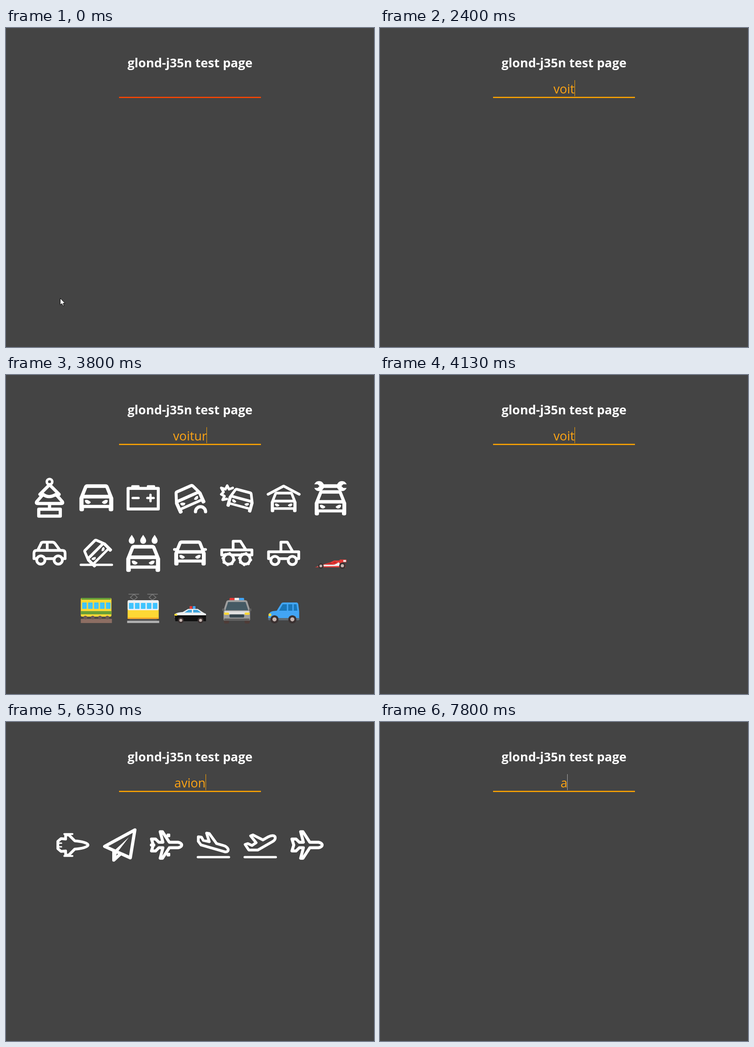
These frames come from a looping animation (804 px wide and 697 px high, 8000 ms). An HTML page:

```html
<!DOCTYPE html>
<html lang="en">
<head>
<meta charset="utf-8">
<title>Icon search</title>
<style>
  html, body { margin: 0; width: 100%; height: 100%; overflow: hidden; background: #444; }
  svg { display: block; width: 804px; height: 697px; }
  text { font-family: "Open Sans", "Noto Sans", sans-serif; text-anchor: middle; white-space: pre; }
  #title { font-size: 27.1px; font-weight: 700; fill: #fff; }
  #query { font-size: 27px; fill: #ffa514; }
  .line { fill: none; stroke: #fff; stroke-width: 6.5; stroke-linecap: round; stroke-linejoin: round; }
  .solid { fill: #fff; fill-rule: evenodd; }
  .wheel { fill: #444; stroke: #fff; stroke-width: 6; }
</style>
</head>
<body>
<svg viewBox="0 0 804 697">
  <rect width="804" height="697" fill="#444"/>
  <text id="title" x="402" y="86">glond-j35n test page</text>
  <text id="query" x="402" y="143"></text>
  <rect id="rule" x="247" y="150.4" width="310" height="2.6"/>
  <rect id="caret" y="114" width="1" height="35"/>
  <g id="icons"></g>
  <path id="cursor" d="M.5.5V15L4 12 6.3 17H8.7L6.7 11.5H11Z" fill="#fff" stroke="#000"/>
</svg>
<script>
const LOOP = 8000, PITCH = 102.3, PER_ROW = 7;
const $ = id => document.getElementById(id);

// Shape helpers; every icon is drawn around its cell centre.
const line = (d, w = 6.5) => `<path class="line" d="${d}" style="stroke-width:${w}"/>`;
const solid = d => `<path class="solid" d="${d}"/>`;
const fill = (d, color) => `<path d="${d}" fill="${color}"/>`;
const box = (x, y, w, h, color, r = 0) =>
  `<rect x="${x}" y="${y}" width="${w}" height="${h}" rx="${r}" fill="${color}"/>`;
const dot = (x, y, r, color) => `<circle cx="${x}" cy="${y}" r="${r}" fill="${color}"/>`;
const wheel = (x, y, r = 9) => `<circle class="wheel" cx="${x}" cy="${y}" r="${r}"/>`;
const tyre = (x, y, r) => dot(x, y, r, '#3a3030') + dot(x, y, r * .5, '#c5b5b0');
const place = (art, x, y, scale = 1, turn = 0) =>
  `<g transform="translate(${x} ${y}) rotate(${turn}) scale(${scale})">${art}</g>`;
const repeat = (n, draw) => Array.from({ length: n }, (_, i) => draw(i)).join('');

const car = solid('M-37 0L-27-25Q-25-30-20-30H20Q25-30 27-25L37 0V25Q37 29 33 29H31Q27 29 27 25V22H-27V25Q-27 29-31 29H-33Q-37 29-37 25Z' +
  'M-20-22L-26-7H26L20-22ZM-28 1V15H28V1Z') +
  solid('M-25 5Q-20 2-12 9Q-14 13-18 13Q-25 12-25 5Z') +
  solid('M25 5Q20 2 12 9Q14 13 18 13Q25 12 25 5Z');

const wrench = dot(-25, -26, 11, '#fff') + dot(25, -26, 11, '#fff') + box(-22, -30, 44, 8, '#fff') +
  fill('M-38-30H-28L-24-26-28-22H-38ZM38-30H28L24-26 28-22H38Z', '#444');

const drop = solid('M0-40C4-34 6.5-31 6.5-27A6.5 6.5 0 0 1-6.5-27C-6.5-31-4-34 0-40Z');

const plane = line('M25-6H6L-9-29H-14L-8-6H-17L-24-13H-33L-29 0-33 13H-24L-17 6H-8L-14 29H-9L6 6H25C31 5 33 2 33 0S31-5 25-6Z');

const airliner = (body, wing) =>
  fill('M-34 0Q-33-5-27-5H22Q34-4 34 1 32 6 22 6H-22Q-32 6-34 0Z', body) +
  fill('M-34-16H-26L-16-4H-31Z', wing) + fill('M8 0H-6L-23 20H-15Z', wing) +
  fill('M9-5H-2L-11-18H-5Z', wing) + fill('M23-4H29L32-1H23Z', '#40c4ff') +
  repeat(6, i => box(-18 + i * 6, -2, 3, 3, '#40a5dc', 1));
const runway = box(-34, 29, 68, 5, '#90a4ae');

const cars = [
  // air freshener
  '<circle class="line" cy="-35.5" r="6" style="stroke-width:5.5"/>' +
    line('M0-29L-21-8H-14L-28 8Q-30 12-26 12H26Q30 12 28 8L14-8H21ZM-14-8Q-2 2 14-8M0 12V23', 7) +
    line('M-23.5 24.5H23.5V39.5H-23.5Z', 7),
  car,
  line('M-33-21H33V24H-33Z') + box(-26, -28, 18, 8, '#fff', 2) + box(8, -28, 18, 8, '#fff', 2) +
    line('M-23 0H-10M9 0H23M16-7V7', 5),
  place(car, -4, 0, .85, -24) + line('M12 30A11 11 0 0 1 34 30', 7),
  place(car, 9.5, 4, .76, 15) + line('M-9-22L-17-19-21-27-25-19-34-22-29-13-34-8-27-4-31 4-22 2', 5.5),
  line('M-34-8L0-26 34-8', 6) + place(car, 0, 9, .76),
  wrench + place(car, 0, 11, .93),
  line('M-34 12V0Q-34-6-28-6H-26L-19-20Q-18-24-14-24H6Q10-24 12-21L23-6H28Q34-6 34 0V12ZM-26-6H23M-5-24V-6', 6) +
    wheel(-19, 15) + wheel(19, 15),
  place(car, 0, -3, .76, -45) + line('M-34 25.5H34', 5),
  [-25, 0, 25].map(x => place(drop, x, 0)).join('') + place(car, 0, 12),
  place(car, 0, 0, .93) + line('M-34-8H-27M27-8H34', 6),
  line('M-33 4V-7H-8V-26H8L20-7H33V4ZM-8-7H20', 6) +
    [-18, 18].map(x => wheel(x, 13, 11) +
      `<circle class="line" cx="${x}" cy="13" r="13.5" stroke-dasharray="4 6.6" style="stroke-width:4;stroke-linecap:butt"/>`).join(''),
  line('M-33 12V-3H-6V-24H8L20-3H33V12ZM-6-3H20', 6) + wheel(-19, 16) + wheel(19, 16),
  // racing car
  fill('M-34 31L-14 24 0 20 8 16H20L33 25V31Z', '#e53935') + fill('M-30 29L-12 25H9L18 20 24 28Z', '#eee') +
    fill('M-12 25L0 21 8 25ZM4 21L10 18 15 23Z', '#c62828') + box(20, 14, 15, 6, '#e53935', 1) + box(28, 15, 6, 4, '#eee') +
    tyre(-21, 28, 6) + tyre(26, 27.5, 7),
  // railway carriage
  box(-34, 23, 68, 9, '#8d6e63') + box(-30, 17, 60, 6, '#4e4a48') + box(-34, -23, 67, 41, '#fdd835', 3) +
    box(-33, -23, 65, 4, '#689f38', 2) + box(-34, 6, 67, 7, '#689f38') +
    repeat(5, i => box(-31 + i * 13, -13, 10, 14, '#40c4ff', 1)) +
    repeat(4, i => dot(-24 + i * 16, 20, 4, '#6d5a55')),
  // tram
  `<path d="M-32-31H-9M9-31H32M-20-31L-28-24-20-18-13-24ZM20-31L13-24 20-18 28-24Z" fill="none" stroke="#757575" stroke-width="1.8"/>` +
    box(-35, 27, 70, 5, '#b0b0b0') + box(-30, 20, 60, 7, '#555') + box(-34, -17, 68, 40, '#fdd835', 3) +
    box(-34, -18, 68, 22, '#eceff1', 3) + box(-34, 20, 68, 3, '#f9a825') +
    repeat(5, i => box(-31 + i * 13, -12, 10, 13, '#40c4ff', 1)),
  // patrol car, side
  box(-1, -5, 6, 6, '#e53935', 1) + box(6, -5, 6, 6, '#42a5f5', 1) +
    fill('M-34 14Q-32 9-16 8L-4 1H17L29 9 35 12V20H-34Z', '#eceff1') + fill('M-34 15H35V28H-32Z', '#111') +
    fill('M-12 9L-3 3H4V9ZM7 3H16L24 9H7Z', '#40a5dc') + box(-34, 12, 6, 4, '#fdd835') +
    tyre(-20, 26, 6.5) + tyre(23, 26, 6.5),
  // patrol car, front
  box(-28, 20, 11, 13, '#4e3b37', 3) + box(17, 20, 11, 13, '#4e3b37', 3) +
    box(-16, -23, 11, 6, '#e53935', 2) + box(-5, -23, 10, 6, '#eee') + box(5, -23, 11, 6, '#42a5f5', 2) +
    fill('M-23-15Q-22-18-17-18H17Q22-18 23-15L29 4V24Q29 27 25 27H-25Q-29 27-29 24V4Z', '#9e9e9e') +
    fill('M-19-14H19L25 4H-25Z', '#455a64') + fill('M-27 6H27L25 13H-25Z', '#e0e0e0') +
    box(-16, 13, 32, 7, '#37474f', 2) + box(-28, 22, 56, 5, '#616161', 2) +
    box(-28, 9, 11, 5, '#fdd835', 2) + box(17, 9, 11, 5, '#fdd835', 2) +
    box(-32, 0, 5, 6, '#616161', 2) + box(27, 0, 5, 6, '#616161', 2),
  // off-roader
  fill('M-33 15Q-32 8-24 6L-15 5-5-11Q-4-13 0-13H28Q31-13 32-9L34 7V25H-32Q-35 21-33 15Z', '#42a5f5') +
    fill('M-10 5L-2-9H7V5ZM10-9H19V5H10ZM22-9H28L30 5H22Z', '#1976b8') +
    box(-33, 11, 6, 6, '#fdd835', 2) + box(-34, 21, 68, 5, '#5d6b75', 2) +
    tyre(-20, 24, 9) + tyre(19, 24, 9)
];

const planes = [
  line('M33 0C33-4 20-8 4-9L-9-22H-16V-13L-26-14-33-8V8L-26 14-16 13V22H-9L4 9C20 8 33 4 33 0Z', 6) +
    line('M-19-24H-1M-19 24H-1', 4) + line('M-33-4H-25M-33 4H-25', 3),
  line('M33-33L-33 3-13 12 23 28ZM-13 12V33L1 20', 7) + solid('M20-17L-14 14-9 28-6 17Z'),
  plane + box(0, -25, 8, 8, '#fff', 2) + box(0, 17, 8, 8, '#fff', 2) + line('M-33 0H-28', 7),
  line('M-33-18V-8L-27 0 25 15C31 16 33 12 32 9 30 4 25 2 21 1L7-3-9-25-15-26-9-7-22-10-26-17Z', 6) +
    line('M-34 26.5H34', 5),
  line('M-33-1L-25 11H-5L28-8C34-12 34-18 30-20 27-21 22-20 18-18L6-11-16-22-21-20-9-5-18 1-27-3Z', 6) +
    line('M-34 26.5H34', 5),
  plane,
  place(airliner('#cfd8dc', '#78909c'), 0, 4, .92, -25),
  place(airliner('#eceff1', '#e53935'), 0, 4, .92, -25),
  place(airliner('#cfd8dc', '#42a5f5'), 0, 0, .92, -20) + runway,
  place(airliner('#cfd8dc', '#42a5f5'), 0, 0, .92, 20) + runway
];

// time, typed text, caret shown
const typing = [
  [0, '', 0], [800, '', 1], [1330, '', 0], [1800, '', 1],
  [2000, 'v', 1], [2200, 'vo', 1], [2330, 'voi', 1], [2400, 'voit', 1], [2530, 'voitu', 1],
  [2670, 'voitur', 1], [2730, 'voiture', 1], [2870, 'voiture', 0], [3400, 'voiture', 1],
  [3800, 'voitur', 1], [3930, 'voitu', 1], [4130, 'voit', 1], [4270, 'voi', 1], [4400, 'vo', 1],
  [4470, 'vo', 0], [4530, 'v', 1], [4730, '', 1], [5000, '', 0],
  [5200, 'a', 1], [5530, 'a', 0], [5870, 'av', 1], [6070, 'avi', 1], [6130, 'avio', 1],
  [6270, 'avion', 1], [6600, 'avion', 0], [7130, 'avion', 1],
  [7330, 'avio', 1], [7470, 'avi', 1], [7670, 'av', 1], [7800, 'a', 1]
];
// time, icon set, number of results
const results = [
  [0, cars, 0], [2870, cars, 11], [3000, cars, 13], [3070, cars, 14], [3130, cars, 19],
  [4000, cars, 0], [6470, planes, 6], [6600, planes, 7], [6670, planes, 10], [7530, planes, 0]
];

const current = (list, t) => list.findLast(row => row[0] <= t);

function showIcons([, set, count]) {
  $('icons').innerHTML = set.slice(0, count).map((art, i) => {
    const row = Math.floor(i / PER_ROW);
    const inRow = Math.min(PER_ROW, count - row * PER_ROW);
    const x = 402 + (i % PER_ROW - (inRow - 1) / 2) * PITCH;
    return place(art, x, 268.7 + row * 120.6);
  }).join('');
}

function showText([, text, caretOn]) {
  const query = $('query'), caret = $('caret');
  query.textContent = text;
  const width = text ? query.getComputedTextLength() : 0;
  caret.setAttribute('x', Math.floor(402 + width / 2));
  caret.setAttribute('fill', text === 'a' ? '#aaa' : '#ffa500');
  caret.setAttribute('visibility', caretOn ? 'visible' : 'hidden');
}

function moveCursor(t) {
  const p = Math.min(1, Math.max(0, (t - 40) / 760));
  const ease = p * p * (3 - 2 * p);
  const away = Math.max(0, t - 800) / 130;
  const x = 118 + 182 * ease - 265 * away;
  const y = 590 - 450 * ease + 110 * away;
  $('cursor').setAttribute('transform', `translate(${x} ${y})`);
  $('cursor').setAttribute('visibility', t < 1000 ? 'visible' : 'hidden');
}

let lastText, lastResult;
function draw(now) {
  const t = now % LOOP;
  const text = current(typing, t), result = current(results, t);
  if (text !== lastText) showText(lastText = text);
  if (result !== lastResult) showIcons(lastResult = result);
  moveCursor(t);
  const focus = Math.min(1, Math.max(0, (t - 800) / 200));
  $('rule').setAttribute('fill', `rgb(255,${Math.round(69 + 96 * focus)},0)`);
}

const start = performance.now();
function tick() {
  draw(performance.now() - start);
  requestAnimationFrame(tick);
}
tick();
</script>
</body>
</html>
```
